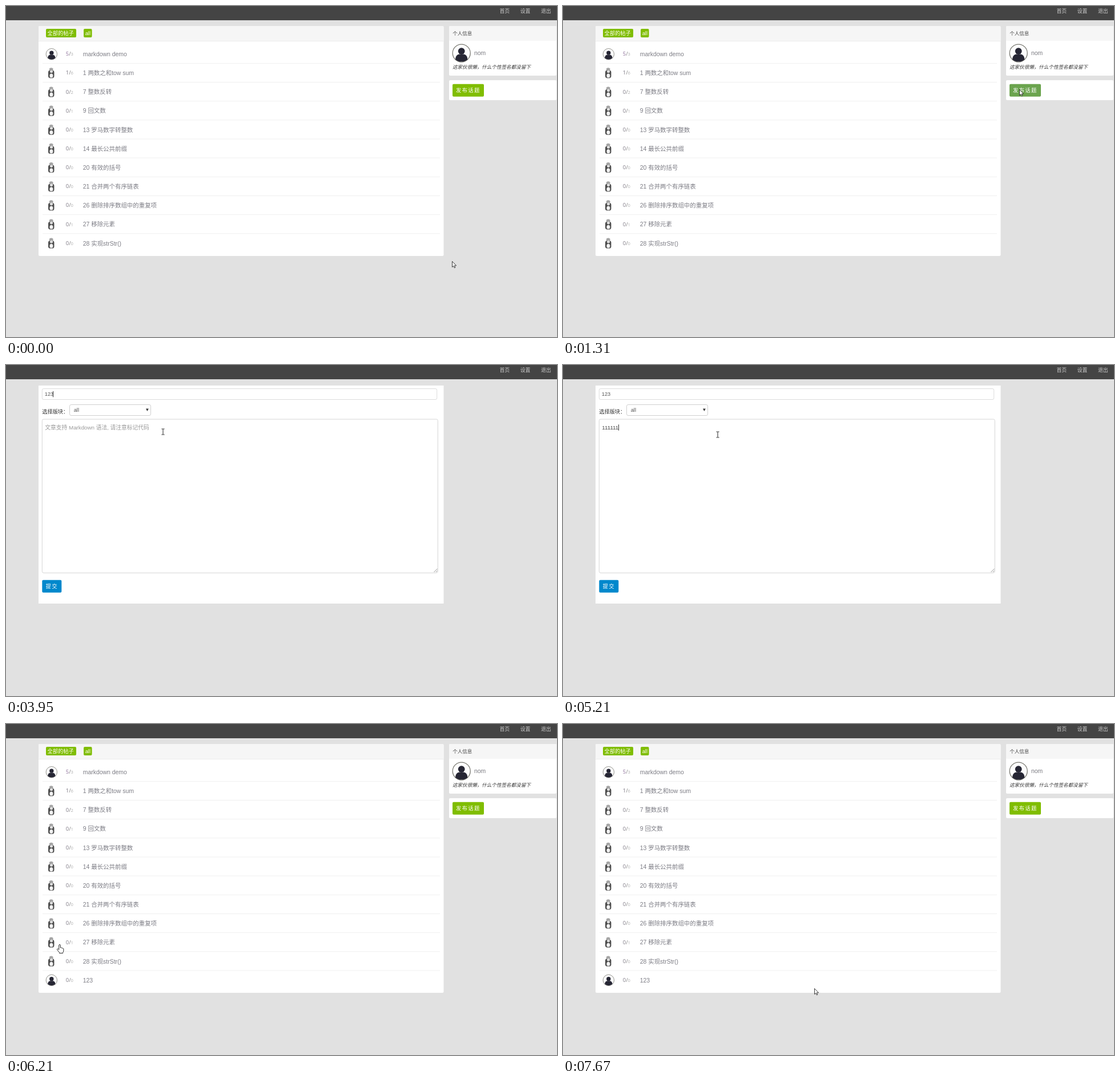
An HTML page that plays this animation: 965x580 px, repeating every 9310 ms.

```html
<!DOCTYPE html>
<html lang="zh">
<head>
<meta charset="utf-8">
<title>Forum post</title>
<style>
  html, body { margin: 0; width: 100%; height: 100%; overflow: hidden; background: #e1e1e1; }
  svg { display: block; width: 100%; height: 100%; }
  text { font-family: "Liberation Sans", "Noto Sans CJK SC", "Noto Sans CJK", sans-serif; white-space: pre; }
  .count { font-family: "Noto Sans", sans-serif; }
</style>
</head>
<body>
<svg id="stage" viewBox="0 0 965 580">
  <defs>
    <g id="person">
      <circle r="9.7" fill="#fdfdfd" stroke="#77776f" stroke-width=".8"/>
      <circle cy="-2.2" r="3.7" fill="#262634"/>
      <path d="M-6.6 6.9C-6.6 2.6-4 1.2-2 1.2H2C4 1.2 6.6 2.6 6.6 6.9C3 10.2-3 10.2-6.6 6.9Z" fill="#262634"/>
    </g>
    <g id="photo">
      <ellipse cy="-6.4" rx="3.4" ry="2.8" fill="#a5a5a5"/>
      <rect x="-5.2" y="-4.6" width="10.4" height="13.4" rx="3.4" fill="#4c4c4c"/>
      <ellipse cx=".3" cy="-2.6" rx="2.6" ry="2.4" fill="#ddd"/>
      <ellipse cx=".2" cy="4.6" rx="3" ry="3.6" fill="#f2f2f2"/>
      <path d="M-3 8.4H3.6" stroke="#888" stroke-width="1"/>
    </g>
  </defs>
  <rect width="965" height="580" fill="#e1e1e1"/>
  <rect width="965" height="25" fill="#444"/>
  <g id="nav"></g>
  <g id="list"></g>
  <g id="form"></g>
  <g id="cursor">
    <path id="arrow" d="M.5 .5V10.6L2.8 8.5L4.3 11.9L5.9 11.2L4.4 7.9H7.6Z" fill="#fff" stroke="#111" stroke-width=".8"/>
    <path id="beam" d="M-2.5 -5H-.6L0 -4.5L.6 -5H2.5M0 -4.5V4.5M-2.5 5H-.6L0 4.5L.6 5H2.5" fill="none" stroke="#222" stroke-width="1"/>
    <path id="hand" d="M-1.3 8.4V.8Q-1.3 -.5 0 -.5Q1.3 -.5 1.3 .8V5Q2.6 4.2 3.4 5.4Q4.7 4.9 5.2 6.1Q6.8 5.9 6.8 7.6V10.4Q6.6 12.2 5.6 13.4V14.6H-.5V13.4L-4.4 8.6Q-5 7.2-3.6 6.9Q-2.6 7-1.3 8.4Z" fill="#fff" stroke="#111" stroke-width=".9"/>
  </g>
</svg>
<script>
const LOOP = 9310, TICK = 77.5;
const GREEN = '#80bd01';
const $ = id => document.getElementById(id);

function add(parent, tag, attrs, content) {
  const el = document.createElementNS('http://www.w3.org/2000/svg', tag);
  for (const key in attrs) el.setAttribute(key, attrs[key]);
  if (content !== undefined) el.textContent = content;
  parent.appendChild(el);
  return el;
}
const box = (g, x, y, width, height, fill, more) =>
  add(g, 'rect', { x, y, width, height, fill, ...more });
const label = (g, x, y, size, fill, str, more) =>
  add(g, 'text', { x, y, 'font-size': size, fill, ...more }, str);
const field = (g, x, y, w, h, stroke) =>
  box(g, x, y, w, h, '#fff', { rx: 2.6, stroke, 'stroke-width': .8 });
const show = (el, on) => el.setAttribute('display', on ? 'inline' : 'none');

['首页', '设置', '退出'].forEach((s, i) => label($('nav'), 864.5 + 36.2 * i, 12.3, 8.8, '#ccc', s));

// Topic list page
const list = $('list');
const ROW = 33.15;
const panel = box(list, 57, 35, 709.5, 403, '#fff', { rx: 2 });
box(list, 57, 35, 709.5, 26, '#f6f6f6', { rx: 2 });
box(list, 57, 61, 709.5, .8, '#e8e8e8');
box(list, 70, 40, 53, 15, GREEN, { rx: 2 });
label(list, 72.6, 51.2, 9.25, '#fff', '全部的帖子');
box(list, 136, 40, 14.5, 15, GREEN, { rx: 2 });
label(list, 138.7, 51, 9.3, '#fff', 'all');

function topic(i, title, replies, visits, own) {
  const g = add(list, 'g', { transform: `translate(0 ${84 + ROW * i})` });
  if (i) box(g, 64, -17.2, 696, .9, '#eee');
  add(g, 'use', { href: own ? '#person' : '#photo', x: own ? 79.8 : 79.2, y: .3 });
  const n = label(g, 104.8, 3.2, 9.3, i ? '#85808b' : '#93779f', replies, { class: 'count' });
  add(n, 'tspan', { fill: '#888' }, '/');
  add(n, 'tspan', { fill: '#b4b4b4', 'font-size': 7.6 }, visits);
  label(g, 134.7, 4, 10.45, '#7d7d85', title);
  return g;
}
[
  ['markdown demo', 5, 3, true], ['1 两数之和tow sum', 1, 6], ['7 整数反转', 0, 2],
  ['9 回文数', 0, 1], ['13 罗马数字转整数', 0, 0], ['14 最长公共前缀', 0, 0],
  ['20 有效的括号', 0, 0], ['21 合并两个有序链表', 0, 0], ['26 删除排序数组中的重复项', 0, 0],
  ['27 移除元素', 0, 1], ['28 实现strStr()', 0, 0]
].forEach((row, i) => topic(i, ...row));
const newTopic = topic(11, '123', 0, 0, true);

// Sidebar
box(list, 776, 35, 188, 87, '#fff', { rx: 2 });
box(list, 776, 35, 188, 26, '#f6f6f6', { rx: 2 });
label(list, 782.3, 51, 8.5, '#444', '个人信息');
add(list, 'use', { href: '#person', transform: 'translate(797.7 82.6) scale(1.6)' });
label(list, 820, 86, 10.4, '#7a7a80', 'nom');
label(list, 782, 110, 8.55, '#333', '这家伙很懒，什么个性签名都没留下', { 'font-style': 'italic' });
box(list, 776, 130, 188, 35, '#fff', { rx: 2 });
const postBtn = box(list, 782, 136.7, 55, 22, GREEN, { rx: 2 });
label(list, 788, 151.2, 9.3, '#fff', '发布话题', { 'letter-spacing': 1.33 });

// New topic page
const form = $('form');
box(form, 57, 36, 709.5, 382, '#fff');
field(form, 63.3, 41.5, 691.4, 19, '#d4d4d4');
const title = label(form, 67.8, 54.3, 9.2, '#555', '');
label(form, 63.3, 85, 9.2, '#333', '选择版块：');
field(form, 111.5, 69.5, 142, 19, '#c4c4c4');
label(form, 118.7, 82.2, 9.3, '#555', 'all');
add(form, 'path', { d: 'M245 76.6H249.8L247.4 81Z', fill: '#333' });
field(form, 63.3, 95, 693, 269.3, '#ccc');
const body = label(form, 68.3, 113.4, 9.75, '#444', '');
add(form, 'path', { d: 'M749.5 363L755.5 357M753 363L755.5 360.5', stroke: '#777', 'stroke-width': .8 });
const sendBtn = box(form, 63.3, 376.7, 34, 22, '#08c', { rx: 2 });
label(form, 69.5, 391.2, 9.3, '#fff', '提交', { 'letter-spacing': 1.33 });
const caret = box(form, 0, 0, 1, 10.5, '#333');

// Pointer stops: tick, x, y
const stops = [
  [0, 781, 447], [11, 809, 136], [13, 809, 148], [15, 809, 148],
  [27, 303, 68], [28, 301, 60], [30, 299, 52], [31, 299, 49], [32, 299, 52],
  [47, 299, 52], [51, 275, 117], [66, 275, 117], [78, 94, 387],
  [83, 94, 387], [95, 441, 472], [99, 440, 463]
];
function pointer(k) {
  const n = stops.findIndex(s => s[0] > k);
  if (n < 0) return stops[stops.length - 1].slice(1);
  const [k0, x0, y0] = stops[n - 1], [k1, x1, y1] = stops[n];
  let u = (k - k0) / (k1 - k0);
  if (k1 - k0 > 2) u = u * u * (3 - 2 * u);
  return [x0 + (x1 - x0) * u, y0 + (y1 - y0) * u];
}
const within = (x, y, l, t, r, b) => x > l && x < r && y > t && y < b;

function typeInto(el, str, hint, color) {
  const s = str || hint;
  if (el.textContent !== s) el.textContent = s;
  el.setAttribute('fill', str ? color : '#999');
}
const typed = (str, times, t) => str.slice(0, times.filter(at => t >= at).length);

function caretOn(t) {
  if (t < 4100) return t < 1730 || (t >= 2240 && t < 2790) || t >= 3260;
  return t < 5560;
}

function draw(t) {
  const k = Math.floor((t + 6) / TICK);
  const onForm = k >= 19 && k < 80;
  const posted = k >= 80;
  const [x, y] = pointer(k);
  show(form, onForm);
  show(list, !onForm);
  show(newTopic, posted);
  panel.setAttribute('height', posted ? 436 : 403);

  const overPost = !onForm && within(x, y, 782, 137, 837, 159);
  const overSend = onForm && within(x, y, 63, 377, 98, 399);
  postBtn.setAttribute('fill', overPost ? '#6ba44e' : GREEN);
  sendBtn.setAttribute('fill', overSend ? '#05c' : '#08c');

  if (onForm) {
    const a = typed('123', [3260, 3340, 3490], t);
    const b = typed('111111', [4330, 4530, 4660, 4810, 4880, 5050], t);
    typeInto(title, a, '标题字数 10 字以上', '#555');
    typeInto(body, b, '文章支持 Markdown 语法, 请注意标记代码', '#444');
    const inBody = t >= 4100;
    const el = inBody ? body : title;
    const width = (inBody ? b : a) ? el.getComputedTextLength() : 0;
    caret.setAttribute('x', Math.floor((inBody ? 68.3 : 67.4) + width));
    caret.setAttribute('y', inBody ? 104.3 : 45.8);
    show(caret, caretOn(t));
  }

  const beam = onForm && (within(x, y, 63, 41, 755, 61) || within(x, y, 63, 95, 756, 364));
  const hand = overSend || (posted && k < 84);
  show($('beam'), beam);
  show($('hand'), hand);
  show($('arrow'), !beam && !hand);
  $('cursor').setAttribute('transform', `translate(${Math.round(x)} ${Math.round(y)})`);
}

const start = performance.now();
function loop() {
  draw((performance.now() - start) % LOOP);
  requestAnimationFrame(loop);
}
loop();
</script>
</body>
</html>
```
